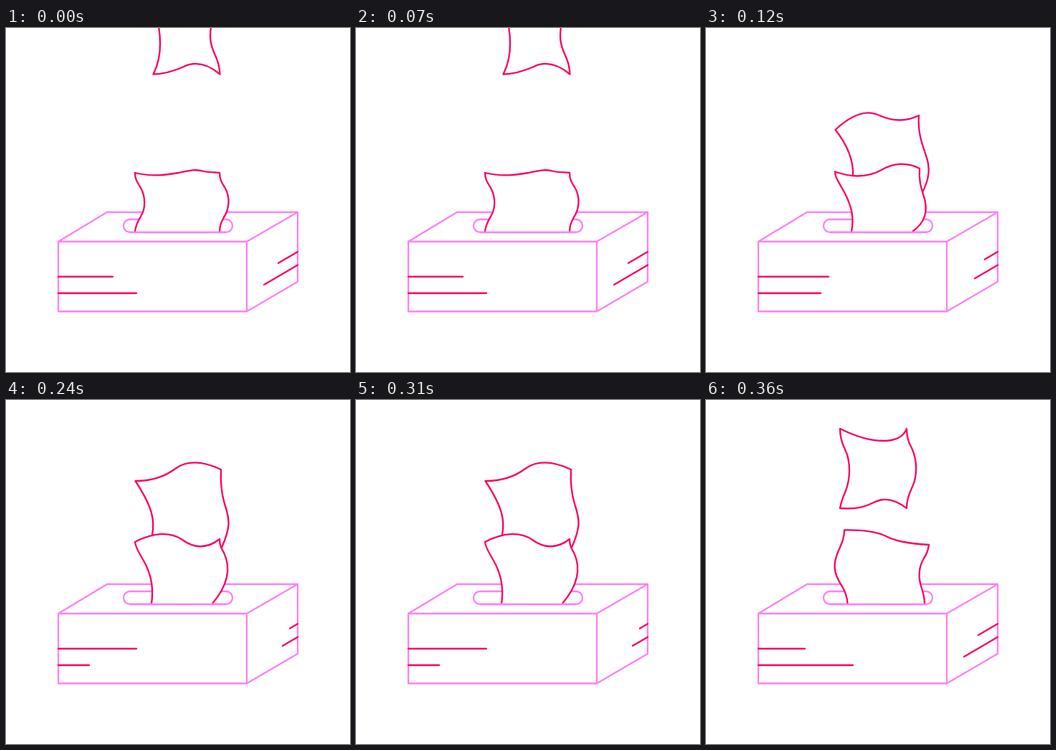
An HTML page with a canvas that plays this animation: 480 by 480 pixels, repeating every 0.48 s.

```html
<!DOCTYPE html>
<html lang="en">
<head>
<meta charset="utf-8">
<title>Tissue box</title>
<style>
  html, body { margin: 0; width: 100%; height: 100%; overflow: hidden; background: #fff; }
  canvas { display: block; width: 480px; height: 480px; }
</style>
</head>
<body>
<canvas id="stage"></canvas>
<script>
const SIZE = 480, STEP = 120;
const PINK = '#ff80f0', RED = '#fa0064';
const canvas = document.getElementById('stage');
const ctx = canvas.getContext('2d');
const ratio = window.devicePixelRatio || 1;
canvas.width = canvas.height = SIZE * ratio;
ctx.scale(ratio, ratio);
ctx.lineWidth = 2.3;
ctx.lineJoin = 'round';

const box = new Path2D('M73 298H336V395.5H73Z L141 257H407V354L336 395.5M336 298L407 257');
const slot = new Path2D('M173 267H307A9 9 0 0 1 307 285H173A9 9 0 0 1 173 267Z');
const slotFront = new Path2D('M173 285H307');

// Each pose: flying tissue, tissue in the slot, front stripe ends, side stripe starts.
const poses = [
  {
    flying: 'M213 -2C217 22 215 46 205.5 64.5C224 64 239 58 248 54C264 46 281 50 298.5 64.5' +
            'C298 54 295 44 291 36C285 22 284 14 286 -2',
    seated: 'M180 284C181 274 185 268 188 263C195 252 195 236 188 223C183 215 180 211 180 202' +
            'C204 208 224 205 241 202C258 198 266 197 276 200C285 202 290 201 298 202' +
            'C298 211 301 216 305 222C313 235 312 252 304 264C300 271 298 276 298 284',
    front: [149, 182], side: [380, 360]
  },
  {
    flying: 'M205 206C206 186 197 163 180.5 142C203 121 224 113 242 122C262 131 281 130 297 122' +
            'C295 148 303 165 307 178C313 195 312 210 302 229',
    seated: 'M203 284C207 264 203 249 194 231C186 216 180 209 180 200.5' +
            'C204 209 227 208 245 198C262 188 281 187 298 196' +
            'C297 214 300 222 303 232C311 254 307 271 288 284',
    front: [171, 160], side: [389, 375]
  },
  {
    flying: 'M204 188C208 167 204 149 180.5 113C202 113 220 108 236 96C251 85 272 84 300 97' +
            'C299 115 300 128 305 145C313 168 313 178 301 206',
    seated: 'M203 284C206 264 203 246 195 230C187 214 181 208 180 198' +
            'C205 185 229 183 246 195C262 207 281 208 298 194' +
            'C298 203 301 208 304 213C314 234 310 258 288 284',
    front: [182, 116], side: [396, 386]
  },
  {
    flying: 'M187 40C213 53 232 57 247 57C264 57 276 51 280 40' +
            'C280 53 284 62 287 67C295 84 295 106 288 121C283 131 280 140 280 151' +
            'C268 142 257 138 247 139C232 140 226 154 187 151' +
            'C188 145 190 138 194 129C202 110 202 85 194 69C189 59 187 52 187 40Z',
    seated: 'M197.5 284C197 274 194 267 190 260C177 241 177 228 185 210C191 197 193 191 193 181.5' +
            'C217 181 234 183 249 189C264 197 280 200 311 202' +
            'C310 210 308 215 304 221C296 234 296 248 301 263C304 272 305 277 305 284',
    front: [138, 205], side: [380, 360]
  }
].map(p => ({ ...p, flying: new Path2D(p.flying), seated: new Path2D(p.seated) }));

function stroke(path, color) {
  ctx.strokeStyle = color;
  ctx.stroke(path);
}

function tissue(path) {
  ctx.fillStyle = '#fff';
  ctx.fill(path);
  stroke(path, RED);
}

function line(x1, y1, x2, y2) {
  ctx.strokeStyle = RED;
  ctx.beginPath();
  ctx.moveTo(x1, y1);
  ctx.lineTo(x2, y2);
  ctx.stroke();
}

function draw(pose) {
  ctx.fillStyle = '#fff';
  ctx.fillRect(0, 0, SIZE, SIZE);
  ctx.lineCap = 'butt';
  stroke(box, PINK);
  stroke(slot, PINK);
  tissue(pose.flying);
  tissue(pose.seated);
  stroke(slotFront, PINK);

  ctx.lineCap = 'round';
  [347, 370].forEach((y, i) => line(73, y, pose.front[i], y));
  [312.3, 330.7].forEach((y, i) => {
    const x = pose.side[i];
    line(x, y + (407 - x) * 0.584, 407, y);
  });
}

const start = performance.now();
function tick() {
  const elapsed = performance.now() - start;
  draw(poses[Math.floor(elapsed / STEP) % poses.length]);
  requestAnimationFrame(tick);
}
tick();
</script>
</body>
</html>
```
